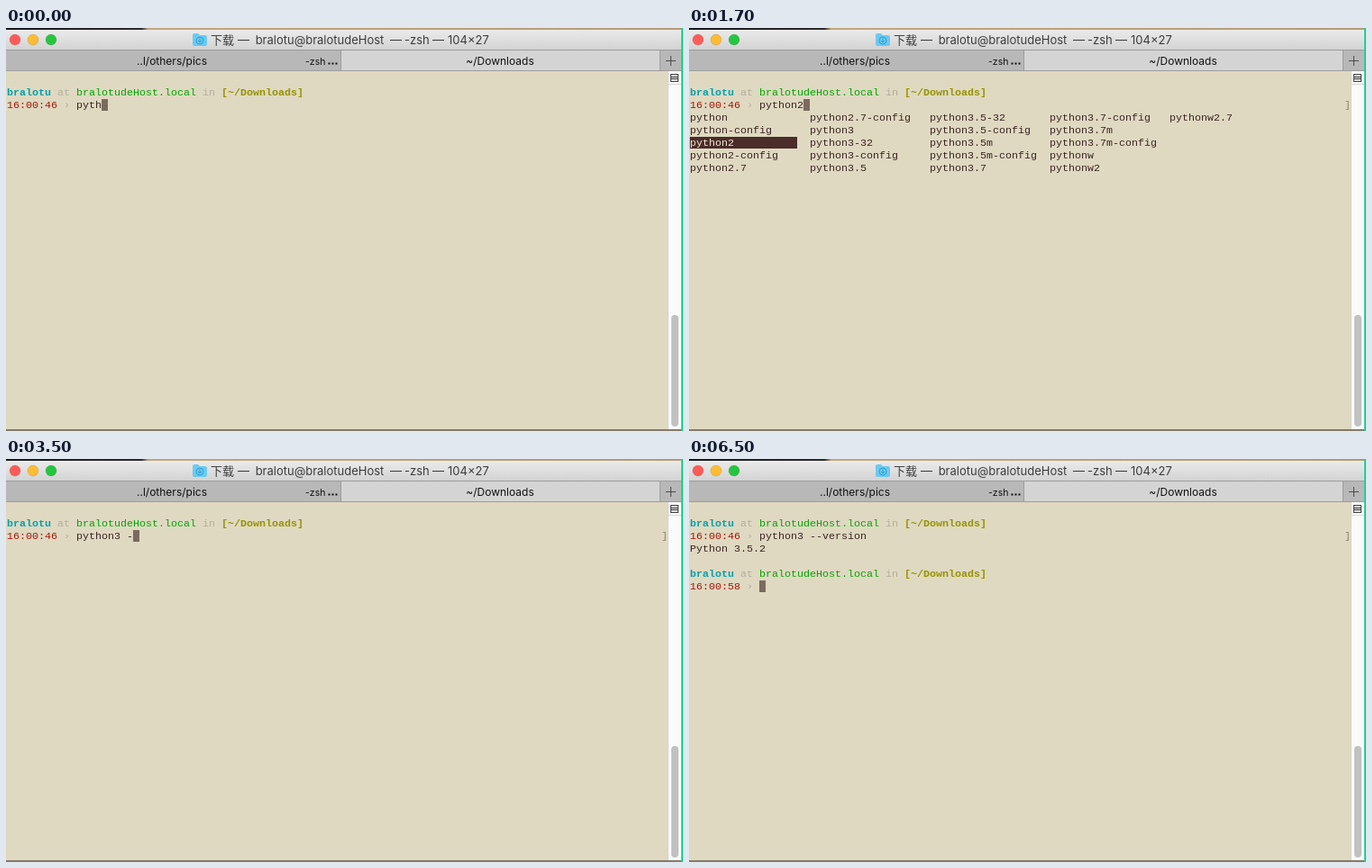
Animation of 751 by 448 pixels, one loop 6.8 s. Source, as an HTML page:

```html
<!DOCTYPE html>
<html lang="en">
<head>
<meta charset="utf-8">
<title>Terminal completion</title>
<style>
  html, body { margin: 0; width: 100%; height: 100%; overflow: hidden; background: #dfd9c1; }
  svg { display: block; }
  text { white-space: pre; }
  .ui { font: 12px Inter, sans-serif; fill: #111; }
  .title { font: 13px Inter, "Noto Sans CJK SC", "Noto Sans CJK", sans-serif; fill: #3c3c3c; }
  #term { font: 11.664px "Liberation Mono", monospace; fill: #3b2322; }
  .user { fill: #00a0ae; font-weight: bold; }
  .host { fill: #00a600; }
  .path { fill: #959200; font-weight: bold; }
  .clock { fill: #a51407; }
  .dim { fill: #b3ae9e; }
  .mark { fill: #89836f; }
  .picked { fill: #eee8d2; }
</style>
</head>
<body>
<svg width="751" height="448" viewBox="0 0 751 448">
  <defs>
    <linearGradient id="bar" x2="0" y2="1">
      <stop stop-color="#ebebeb"/><stop offset="1" stop-color="#d3d3d3"/>
    </linearGradient>
    <linearGradient id="desk">
      <stop stop-color="#16191f"/><stop offset=".2" stop-color="#2b2a2b"/>
      <stop offset=".21" stop-color="#c4a67c"/><stop offset="1" stop-color="#b59a74"/>
    </linearGradient>
  </defs>

  <rect width="751" height="448" fill="#dfd9c1"/>
  <rect width="751" height="2" fill="url(#desk)"/>
  <rect y="446" width="751" height="2" fill="#847a69"/>

  <rect y="2" width="749" height="22" fill="url(#bar)"/>
  <g stroke="#000" stroke-opacity=".15" stroke-width=".7">
    <circle cx="10" cy="13" r="6" fill="#fc5b57"/>
    <circle cx="30" cy="13" r="6" fill="#fdbc34"/>
    <circle cx="50" cy="13" r="6" fill="#26c540"/>
  </g>
  <path d="M207 8q0-2 2-2h4l2 2h6q2 0 2 2v8q0 2-2 2h-12q-2 0-2-2z" fill="#6ccaf0"/>
  <circle cx="215" cy="14" r="4" fill="none" stroke="#2b9fd0"/>
  <path d="M215 11.5v4m-2-1.5l2 2 2-2" fill="none" stroke="#2b9fd0"/>
  <g class="title">
    <text x="227" y="18">下载</text>
    <text x="257" y="18">—</text>
    <text x="348" y="18" text-anchor="middle">bralotu@bralotudeHost</text>
    <text x="426" y="18">—</text>
    <text x="442" y="18">-zsh</text>
    <text x="473" y="18">—</text>
    <text x="490" y="18">104×27</text>
  </g>

  <rect y="24" width="749" height="24" fill="#b8b8b8"/>
  <rect x="372" y="25" width="353" height="22" fill="#d4d4d4"/>
  <path d="M0 24.5H749M371.5 24V48M725.5 24V48M0 47.5H749" stroke="#9c9c9c"/>
  <path d="M732 36.5h11M737.5 31v11" stroke="#4c4c4c"/>
  <g class="ui">
    <text x="184" y="41" text-anchor="middle">..l/others/pics</text>
    <text x="332" y="41" font-size="10.5">-zsh</text>
    <text x="548" y="41" text-anchor="middle">~/Downloads</text>
  </g>
  <path d="M357.5 39.5h2m2 0h2m2 0h2" stroke="#111" stroke-width="2"/>

  <rect x="734" y="48" width="15" height="398" fill="#fafafa"/>
  <path d="M734.5 48V446M735 62.5H749" stroke="#d6d6d6"/>
  <rect x="737.5" y="51.5" width="8" height="8" fill="#ddd" stroke="#444"/>
  <path d="M738 54.5h7M738 56.5h7" stroke="#444"/>
  <rect x="738" y="319" width="8" height="124" rx="4" fill="#c1c1c1"/>
  <rect x="749" width="2" height="448" fill="#20cf92"/>

  <g id="term"></g>
</svg>
<script>
const LOOP = 6800, CHAR = 7, LINE = 14;
const TIMES = {
  keys: [0, 0, 0, 0, 100, 200],
  list: 700,
  picks: [1400, 1600, 1700, 1900, 2000, 2100, 2500],
  accept: 2800,
  args: [2900, 3500, 3600, 3800, 3900, 4000, 4100, 4200, 4300, 4400],
  run: 4900
};
const ITEMS = ['', '-config', '2', '2-config', '2.7', '2.7-config', '3', '3-32', '3-config',
  '3.5', '3.5-32', '3.5-config', '3.5m', '3.5m-config', '3.7', '3.7-config', '3.7m',
  '3.7m-config', 'w', 'w2', 'w2.7'].map(suffix => 'python' + suffix);

const term = document.getElementById('term');
const passed = (times, t) => times.filter(time => t >= time).length;

const text = (col, row, string, style = '') =>
  `<text x="${1 + col * CHAR}" y="${75 + row * LINE}" class="${style}">${string}</text>`;
const block = (col, row, cols, color) =>
  `<rect x="${1 + col * CHAR}" y="${65 + row * LINE}" width="${cols * CHAR}" height="13" fill="${color}"/>`;

function prompt(row, clock, command, active) {
  return text(0, row, 'bralotu', 'user') + text(8, row, 'at', 'dim') +
    text(11, row, 'bralotudeHost.local', 'host') + text(31, row, 'in', 'dim') +
    text(34, row, '[~/Downloads]', 'path') +
    text(0, row + 1, clock, 'clock') + text(9, row + 1, '›', 'dim') +
    text(11, row + 1, command) +
    (active ? block(11 + command.length, row + 1, 1, '#7a6b5e') : '');
}

function menu(picked) {
  return ITEMS.map((item, i) => {
    const col = Math.floor(i / 5) * 19, row = 2 + i % 5;
    return i === picked
      ? block(col, row, 17, '#4b2c29') + text(col, row, item, 'picked')
      : text(col, row, item);
  }).join('');
}

function screen(t) {
  const picked = passed(TIMES.picks, t) - 1;
  const word = picked < 0 ? 'python'.slice(0, passed(TIMES.keys, t)) : ITEMS[picked];
  const command = word + ' --version'.slice(0, passed(TIMES.args, t));
  const done = t >= TIMES.run;
  let out = prompt(0, '16:00:46', command, !done);
  if (t >= TIMES.list) out += text(103.7, 1, ']', 'mark');
  if (t >= TIMES.list && t < TIMES.accept) out += menu(picked);
  if (done) out += text(0, 2, 'Python 3.5.2') + prompt(4, '16:00:58', '', true);
  return out;
}

let shown;
function frame() {
  const next = screen(performance.now() % LOOP);
  if (next !== shown) term.innerHTML = shown = next;
  requestAnimationFrame(frame);
}
frame();
</script>
</body>
</html>
```
